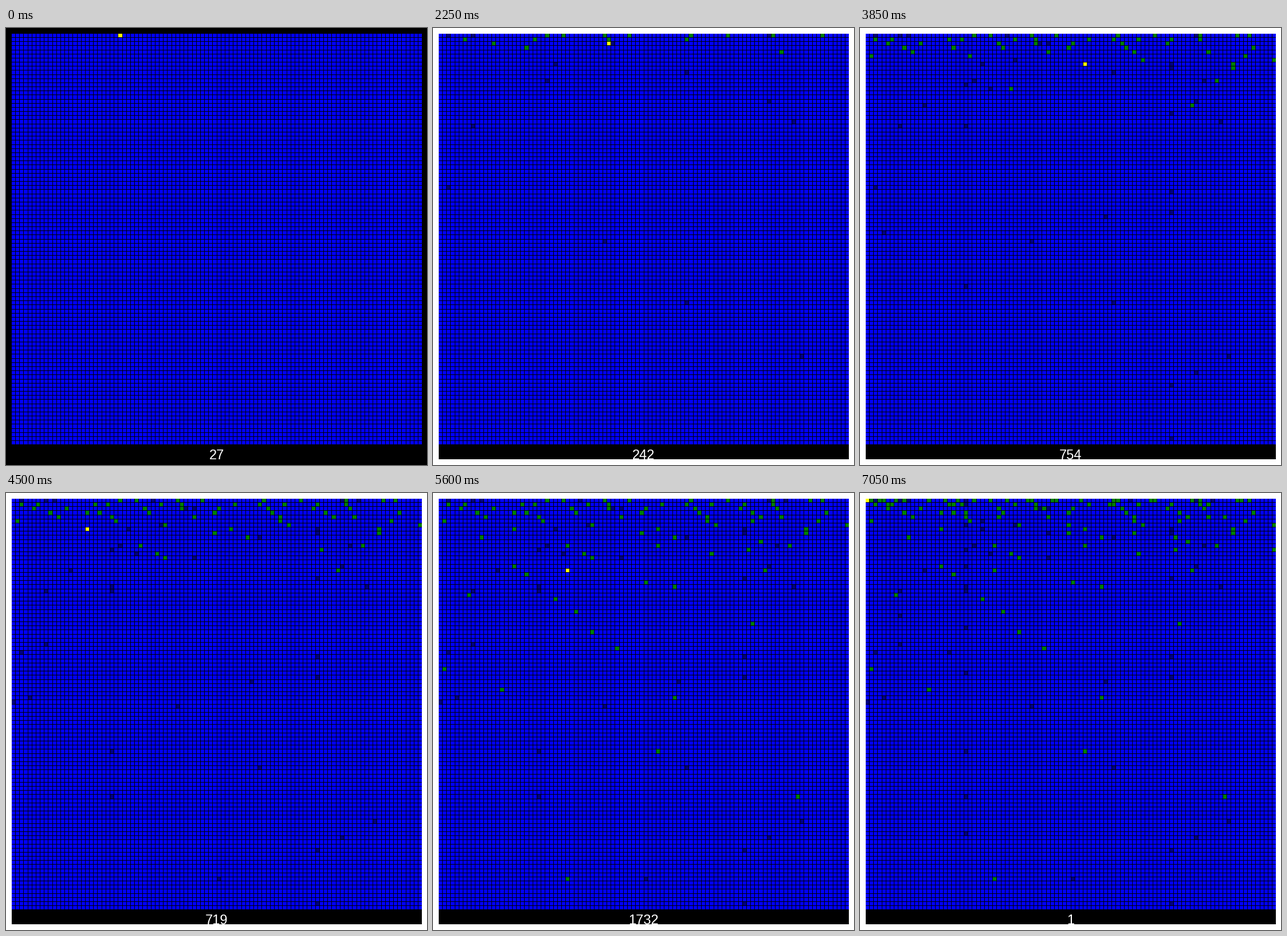
A matplotlib script that plays this animation: 735x762 px, repeating every 7850 ms.

```python
import numpy as np
import matplotlib.pyplot as plt
from matplotlib.animation import FuncAnimation
from matplotlib.patches import Rectangle

WIDTH, HEIGHT, DPI = 735, 762, 100
BOARD_START, BOARD_END, STRIP_END = 10, 726, 752
CELLS, ORIGIN, PITCH = 100, 9.32, 7.175
INTERVAL, LOOP = 50, 7850
FIRST_HOLD, RUN_START = 750, 1550

BLUE, NAVY, GREEN, YELLOW = range(4)
PALETTE = np.array([(0, 0, 255), (0, 0, 128), (0, 128, 0), (255, 255, 0)],
                   dtype=np.uint8)


def collatz(n):
    path = [n]
    while n != 1:
        n = n // 2 if n % 2 == 0 else 3 * n + 1
        path.append(n)
    return path


def radicals(limit):
    """Product of the distinct primes of every number up to limit."""
    rad = np.ones(limit + 1, dtype=int)
    for p in range(2, limit + 1):
        if rad[p] == 1:
            rad[p::p] *= p
    return rad


PATH = collatz(27)
RAD = radicals(CELLS * CELLS)

# Grid lines fill whole pixels; each cell lies between two of them.
lines = np.floor(ORIGIN + PITCH * np.arange(CELLS + 1)).astype(int)
board_pixels = np.arange(BOARD_START, BOARD_END)
cell_of_pixel = np.searchsorted(lines, board_pixels) - 1
on_line = np.isin(board_pixels, lines)
grid = on_line[:, None] | on_line[None, :]
board = slice(BOARD_START, BOARD_END)


def cell_states(step, mark_family):
    state = np.full(CELLS * CELLS + 1, BLUE)
    if mark_family:
        # An odd value darkens all numbers built from the same primes.
        for n in PATH[:step + 1]:
            if n % 2:
                state[RAD == RAD[n]] = NAVY
    state[PATH[:step]] = GREEN
    state[PATH[step]] = YELLOW
    return state[1:].reshape(CELLS, CELLS)


def render(step, opening):
    stage = np.full((HEIGHT, WIDTH, 3), 0 if opening else 255, dtype=np.uint8)
    stage[BOARD_END:STRIP_END, board] = 0
    cells = cell_states(step, not opening)
    pixels = PALETTE[cells[np.ix_(cell_of_pixel, cell_of_pixel)]]
    pixels[grid] = 0
    stage[board, board] = pixels
    return stage


fig = plt.figure(figsize=(WIDTH / DPI, HEIGHT / DPI), dpi=DPI, facecolor="black")
ax = fig.add_axes([0, 0, 1, 1])
ax.axis("off")
image = ax.imshow(render(0, True), extent=(0, WIDTH, HEIGHT, 0),
                  interpolation="nearest", aspect="auto")
label = ax.text((BOARD_START + BOARD_END) / 2, STRIP_END, "27", color="white",
                fontsize=17, family="Liberation Sans", ha="center", va="baseline")
label.set_clip_path(Rectangle((0, 0), WIDTH, STRIP_END, transform=ax.transData))
label.set_clip_on(True)


def update(frame):
    time = frame * INTERVAL
    step = 0
    if time >= RUN_START:
        step = min((time - RUN_START) // INTERVAL + 1, len(PATH) - 1)
    image.set_data(render(step, time < FIRST_HOLD))
    label.set_text(str(PATH[step]))
    return image, label


animation = FuncAnimation(fig, update, frames=LOOP // INTERVAL,
                          interval=INTERVAL, repeat=True, repeat_delay=0)
plt.show()
```
